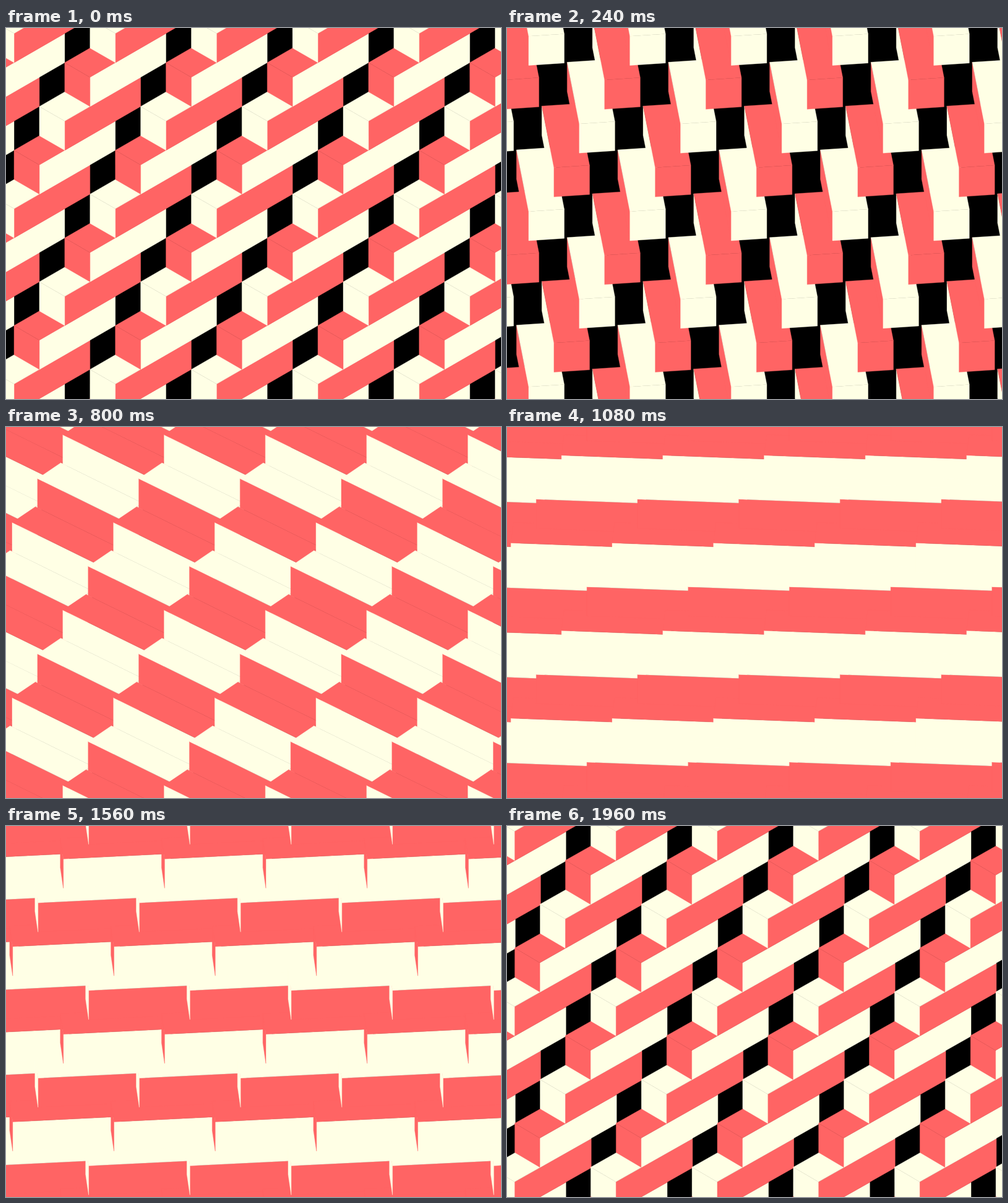
An HTML page with a canvas for the animation above (2 s loop, 800 px wide and 600 px high).

```html
<!DOCTYPE html>
<html lang="en">
<head>
<meta charset="utf-8">
<title>Turning blocks</title>
<style>
html, body { margin: 0; width: 100%; height: 100%; overflow: hidden; background: #000; }
canvas { display: block; }
</style>
</head>
<body>
<canvas id="stage" width="800" height="600"></canvas>
<script>
const ctx = document.getElementById('stage').getContext('2d');
const RED = '#ff6464', CREAM = '#ffffe5';
const LOOP = 2000;
const HEIGHT = 47.25;                  // projected height of a block
const UNIT = HEIGHT * Math.sqrt(1.5);  // true edge of the cube unit
const TILT = 1 / Math.sqrt(3);         // isometric squash of the ground plane
const STEP = HEIGHT * Math.sqrt(3) / 2;

// time, turn in degrees, speed in degrees per ms
const KEYS = [
  [0, 0, .015], [240, 51.2, .285], [400, 83.4, .1], [600, 90, .01],
  [800, 94.5, .065], [1080, 131.2, .048], [1310, 135, 0],
  [1560, 139.8, .055], [1960, 179.4, .015], [2000, 180, .015]
];

function turnAt(t) {
  let i = 0;
  while (t > KEYS[i + 1][0]) i++;
  const [t0, a0, v0] = KEYS[i], [t1, a1, v1] = KEYS[i + 1];
  const d = t1 - t0, u = (t - t0) / d, w = 1 - u;
  return w * w * ((1 + 2 * u) * a0 + u * d * v0)
       + u * u * ((3 - 2 * u) * a1 - w * d * v1);
}

// Blocks further right lie in front.
const blocks = [];
for (let row = -4; row < 12; row++) {
  for (let col = -2; col < 9; col++) {
    const x = 176.7 - STEP * row + 4 * STEP * col;
    if (x > -150 && x < 950) {
      blocks.push({ x, y: 32.4 + 1.5 * HEIGHT * row, odd: row & 1 });
    }
  }
}
blocks.sort((a, b) => a.x - b.x);

function face(points, color) {
  ctx.beginPath();
  for (const [x, y] of points) ctx.lineTo(x, y);
  ctx.closePath();
  ctx.fillStyle = ctx.strokeStyle = color;
  ctx.fill();
  ctx.stroke();
}

function draw(t) {
  const a = (225 + turnAt(t)) * Math.PI / 180;
  const c = Math.cos(a), s = Math.sin(a);
  const place = (p, q) => [UNIT * (p * c - q * s), -UNIT * TILT * (p * s + q * c)];
  const top = [place(1.5, .5), place(-1.5, .5), place(-1.5, -.5), place(1.5, -.5)];
  const drop = ([x, y]) => [x, y + HEIGHT];

  // Upright faces turned to the viewer; even ones are the long sides.
  const walls = [];
  top.forEach((p, i) => {
    const q = top[(i + 1) % 4];
    if (p[1] + q[1] > 0) walls.push({ long: i % 2 === 0, points: [p, q, drop(q), drop(p)] });
  });
  walls.sort((m, n) => n.long - m.long);

  ctx.setTransform(1, 0, 0, 1, 0, 0);
  ctx.fillStyle = '#000';
  ctx.fillRect(0, 0, 800, 600);
  ctx.lineWidth = .4;
  for (const { x, y, odd } of blocks) {
    ctx.setTransform(1, 0, 0, 1, x, y);
    const main = odd ? CREAM : RED, side = odd ? RED : CREAM;
    for (const w of walls) face(w.points, w.long ? side : main);
    face(top, main);
  }
}

const start = performance.now();
function frame() {
  draw((performance.now() - start) % LOOP);
  requestAnimationFrame(frame);
}
frame();
</script>
</body>
</html>
```
